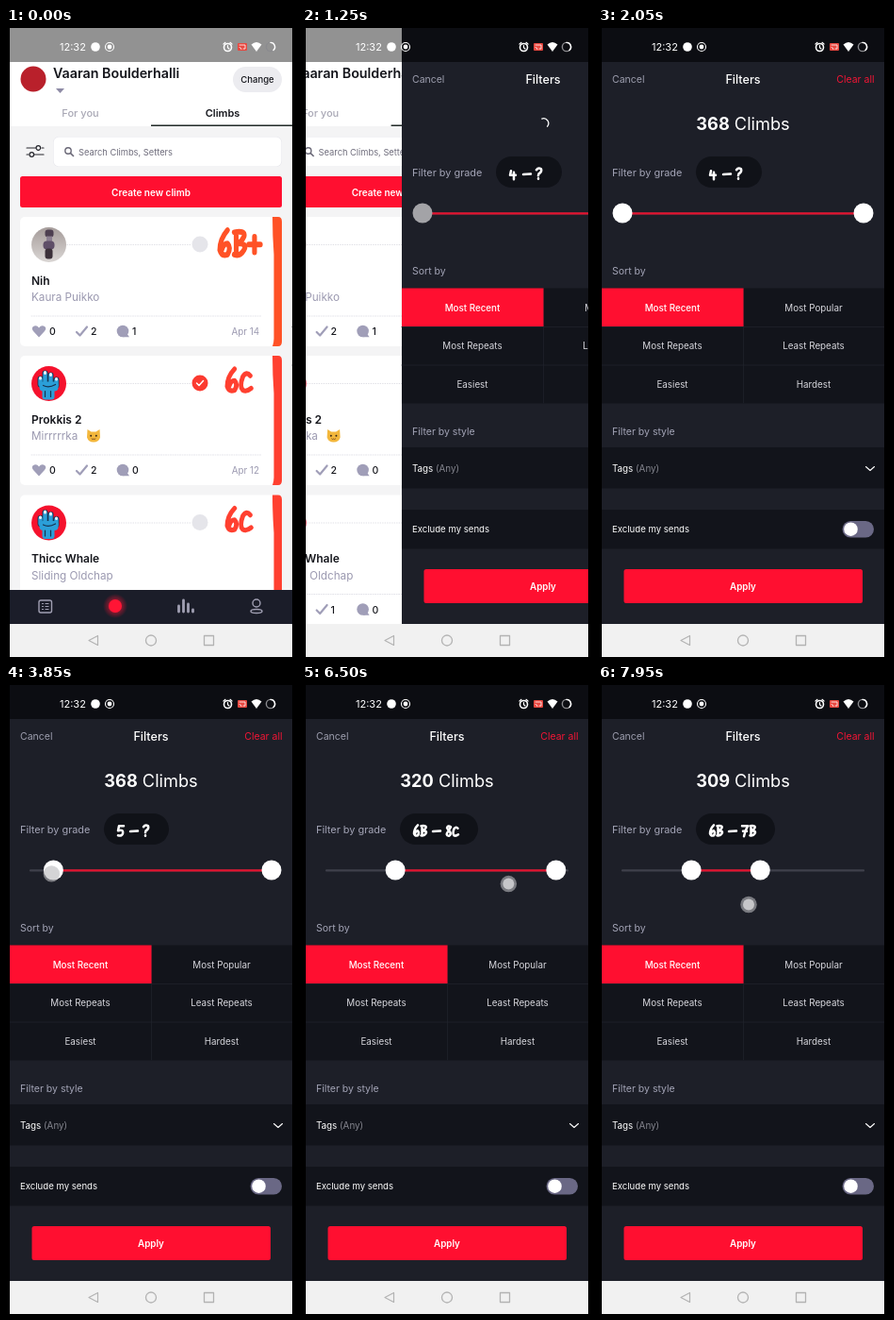
Write an HTML page that moves like this. It is 308x666 px and loops after 8000 ms.

```html
<!DOCTYPE html>
<html lang="en">
<head>
<meta charset="utf-8">
<title>Climb filters</title>
<style>
  html, body { margin: 0; width: 100%; height: 100%; overflow: hidden; background: #000; }
  svg { display: block; width: 100vw; height: 100vh; font-family: Inter, Roboto, sans-serif; }
  .line { fill: none; stroke-linecap: round; stroke-linejoin: round; }
</style>
</head>
<body>
<svg id="stage" viewBox="0 0 308 666"></svg>
<script>
const LOOP = 8000, RED = '#ff0f30', GREY = '#9b99b0', DARK = '#15161c';
const GRADES = ['4', '4+', '5', '5+', '6A', '6A+', '6B', '6B+', '6c', '6c+', '7A', '7A+',
  '7B', '7B+', '7c', '7c+', '8A', '8A+', '8B', '8B+', '8c', '?'];

// Brush lettering: advance width and stroke path on a 12-unit cap height
const GLYPHS = {
  4: [9, 'M2 3L1 7.5H7M5 4.5V12'],
  5: [8, 'M7 1H2L1 6Q7 4 6 9 5 12 1 11'],
  6: [7.5, 'M5 0Q1 4 1 9 2 12 5 11 7 8 5 6 3 6 2 9'],
  7: [8.5, 'M1 1H7Q4 6 3 12M2 6.5H6'],
  8: [7.5, 'M6 2Q3 0 2 3 3 5 5 7 7 10 4 11.5 0 11 3 7L6 2'],
  A: [8, 'M1 12L4 0 7 12M1.5 8H6'],
  B: [7.5, 'M2 1V11M1 1Q7 0 6 3 5 5 3 6 8 6 6 9 4 12 1 11'],
  c: [7.5, 'M6 3.5Q4 1 2 4 0 9 2 11 4 12 6.5 10'],
  '+': [8, 'M1 6.5H7M4 3V10'],
  '-': [19, 'M6 6.8L14 6.2'],
  '?': [8, 'M1 2Q3 -1 6 1 7 4 3.5 6L3 8M3 11V11.5']
};

const text = (x, y, size, str, fill, weight = 400, anchor = 'start') =>
  `<text x="${x}" y="${y}" font-size="${size}" fill="${fill}" font-weight="${weight}" text-anchor="${anchor}">${str}</text>`;
const rect = (x, y, w, h, fill, r = 0) =>
  `<rect x="${x}" y="${y}" width="${w}" height="${h}" rx="${r}" fill="${fill}"/>`;
const circle = (x, y, r, fill, extra = '') =>
  `<circle cx="${x}" cy="${y}" r="${r}" fill="${fill}" ${extra}/>`;
const line = (d, stroke, w = 1, extra = '') =>
  `<path class="line" d="${d}" stroke="${stroke}" stroke-width="${w}" ${extra}/>`;
const at = (x, y, body) => `<g transform="translate(${x} ${y})">${body}</g>`;

const brushWidth = str => [...str].reduce((sum, c) => sum + GLYPHS[c][0], 0);
function brush(str, color, weight) {
  let x = 0;
  return [...str].map(c => {
    const part = at(x, 0, line(GLYPHS[c][1], color, weight));
    x += GLYPHS[c][0];
    return part;
  }).join('');
}

const bottle = circle(0, 0, 18.5, 'url(#photo)') +
  rect(-4, -16, 9, 8, '#4d3f50', 3) + rect(-2.5, -9, 6, 6, '#8b7f90') +
  rect(-6, -4, 12, 9, '#5f4f68', 4) + rect(-4, 4, 8, 11, '#3b3039', 3);
const glove = circle(0, 0, 18.5, '#f5122d') +
  line('M-9 -5V1M-4 -11V0M2 -9V0M8 -4V2', '#16324e', 6) +
  line('M-9 -5V1M-4 -11V0M2 -9V0M8 -4V2', '#2b9fd8', 4.4) +
  line('M-9 -6V-5.5M-4 -12V-11M2 -10V-9M8 -5V-4.5', '#e8f2f8', 3) +
  rect(-10, -2, 20, 10, '#2b9fd8', 4) + rect(-7, 4, 13, 13, '#2b9fd8', 3) +
  line('M-6 2Q0 5 7 1M-4 8V14M2 8V14', '#16324e', 1.2);
const cat = at(93, 85, '<path d="M-6.5 -7L-2.5 -4.5H2.5L6.5 -7 7 1.5Q5.5 6.5 0 6.5T-7 1.5Z" fill="#f3b73c"/>' +
  circle(-2.8, -.3, 1, '#3a2a1a') + circle(2.8, -.3, 1, '#3a2a1a') + line('M-2 3Q-1 4.2 0 3 1 4.2 2 3', '#7a4a20', .9));

function card(y, { name, setter, avatar, grade, gx, gy, sx, sy, color, sent, stats, date, pet = '' }) {
  const status = sent
    ? circle(206, 29, 8.5, '#fb3a30') + line('M202.5 29L205 31.5 209.5 26.5', '#fff', 1.5)
    : circle(206, 29, 8.5, '#e5e5ea');
  return at(0, y,
    rect(15, 0, 278, 137, '#fff', 5) +
    `<path d="M283 0H289Q293 0 293 5V132Q293 137 289 137H283Q284.5 133 284.5 129V40Q283 20 283 0Z" fill="${color}"/>` +
    line('M65 29.5H197', '#dedee4', 1, 'stroke-dasharray=".5 2"') +
    at(45.5, 29.5, avatar) + status +
    `<g transform="translate(${gx} ${gy}) scale(${sx} ${sy})">${brush(grade, color, 2.5)}</g>` +
    text(27, 71.5, 12, name, DARK, 600) + text(27, 89, 11.7, setter, GREY) + pet +
    line('M27 105H271', '#e4e4ea', 1, 'stroke-dasharray="1 1.5"') +
    '<path d="M35 127.5L29 121Q26 117 30 115.5 33 114.5 35 117.5 37 114.5 40 115.5 44 117 41 121Z" fill="#a09eb8"/>' +
    line('M75 122L78.5 125.5 86 116.5', '#a09eb8', 2.2) +
    circle(124, 121, 6.3, '#a09eb8') + '<path d="M128 123L131 127.3H124Z" fill="#a09eb8"/>' +
    stats.map((n, i) => text([46, 90, 134][i], 125, 10.5, n, DARK, 500)).join('') +
    text(269, 125, 9.8, date, GREY, 400, 'end'));
}

const hard = { avatar: glove, grade: '6c', gx: 233, gy: 14, sx: 1.95, sy: 2.05, color: '#ff4030' };
const listScreen =
  rect(4, 0, 300, 36, '#929292') + rect(4, 36, 300, 68, '#fff') + rect(4, 104, 300, 527, '#f4f4f5') +
  circle(29, 54, 13.5, '#b9202b') +
  text(50, 53, 14.3, 'Vaaran Boulderhalli', DARK, 600) +
  '<path d="M53 64H62L57.5 69Z" fill="#8d8aa5"/>' +
  rect(241, 41, 52, 27, '#ececf0', 13.5) + text(267, 58, 9.5, 'Change', DARK, 500, 'middle') +
  text(79, 94, 11, 'For you', '#a9a8b5', 500, 'middle') +
  text(230, 94, 11, 'Climbs', DARK, 600, 'middle') + rect(154, 102.5, 150, 1.5, '#222b28') +
  `<g id="filterIcon">${line('M22 127H32M38 127H40M22 134H24M30 134H40', '#24252c', 1.2)}
    ${line('M32 127a2.3 2.3 0 1 0 4.6 0a2.3 2.3 0 1 0 -4.6 0M25 134a2.3 2.3 0 1 0 4.6 0a2.3 2.3 0 1 0 -4.6 0', '#24252c', 1.2)}</g>` +
  rect(50, 115, 243, 32, '#e8e8ed', 6) + rect(50.6, 115.6, 241.8, 30.8, '#fff', 5.5) +
  circle(66, 130, 3.2, 'none', 'stroke="#6b6978" stroke-width="1.4"') + line('M68.6 132.6L71.5 135.5', '#6b6978', 1.6) +
  text(77, 134.5, 9.3, 'Search Climbs, Setters', '#6f6d7c') +
  rect(15, 157, 278, 33, RED, 2.5) + text(154, 177.5, 10, 'Create new climb', '#fff', 600, 'middle') +
  card(200, { name: 'Nih', setter: 'Kaura Puikko', avatar: bottle, grade: '6B+', gx: 225, gy: 14,
    sx: 2.05, sy: 2.35, color: '#ff5226', stats: [0, 2, 1], date: 'Apr 14' }) +
  card(347, { ...hard, name: 'Prokkis 2', setter: 'Mirrrrrka', sent: true, pet: cat, stats: [0, 2, 0], date: 'Apr 12' }) +
  card(494.5, { ...hard, name: 'Thicc Whale', setter: 'Sliding Oldchap', stats: [0, 1, 0], date: 'Apr 12' });

const tabBar = rect(4, 595, 300, 36, '#1b1d29') +
  '<rect x="35" y="606" width="13.5" height="13" rx="2" fill="none" stroke="#a09fb2" stroke-width="1.4"/>' +
  line('M38.5 609.5H39.5M42 609.5H45M38.5 612.5H39.5M42 612.5H45M38.5 615.5H39.5M42 615.5H45', '#a09fb2', 1.2) +
  circle(116, 612, 13, 'url(#glow)') + circle(116, 612, 7, '#ff1535') +
  line('M183.5 618V612M188.5 618V606M193.5 618V610M198.5 618V616', '#a09fb2', 2.8) +
  circle(266, 609, 4, 'none', 'stroke="#a09fb2" stroke-width="1.4"') +
  '<ellipse cx="266" cy="617.5" rx="6" ry="2" fill="none" stroke="#a09fb2" stroke-width="1.4"/>';

const SORTS = ['Most Recent', 'Most Popular', 'Most Repeats', 'Least Repeats', 'Easiest', 'Hardest'];
const panelScreen =
  rect(4, 0, 300, 631, '#1d1f28') + rect(4, 0, 300, 36, '#0c0d12') +
  text(15, 57.5, 10.5, 'Cancel', '#9d9eae') + text(154, 58.5, 12.6, 'Filters', '#fff', 500, 'middle') +
  text(293.5, 57.5, 10.5, 'Clear all', '#f01535', 400, 'end') +
  '<text id="count" x="154" y="108" font-size="18.2" fill="#fff" text-anchor="middle"><tspan id="total" font-weight="700"></tspan> Climbs</text>' +
  `<g id="spinner">${line('M1.5 -5A5.2 5.2 0 0 1 1.5 5', '#fff', 1.3)}</g>` +
  text(15, 156.5, 10.9, 'Filter by grade', '#a3a4b6') +
  '<rect id="pill" x="104" y="136" height="33" rx="16.5" fill="#101218"/><g id="range" transform="translate(118 148.3)"></g>' +
  line('M26 196.4H282', '#3f404b', 2.2) +
  line('', '#e3122e', 2.2, 'id="active"') + circle(26, 196, 10.5, '#fff', 'id="low"') + circle(282, 196, 10.5, '#fff', 'id="high"') +
  text(15, 261, 10.5, 'Sort by', '#a3a4b6') +
  rect(4, 275.5, 300, 122, '#12141b') +
  line('M154.5 275.5V397M4 316.5H304M4 357H304', '#20222b', .8) + rect(4, 275.5, 150.5, 40.5, RED) +
  SORTS.map((s, i) => text(i % 2 ? 229 : 79, 299.5 + 40.7 * (i >> 1), 9.8, s, i ? '#d6d6dc' : '#fff', i ? 400 : 500, 'middle')).join('') +
  text(15, 430.5, 10.5, 'Filter by style', '#a3a4b6') +
  rect(4, 444, 300, 43.5, '#12141b') +
  text(15, 470, 9.8, 'Tags <tspan fill="#85868f">(Any)</tspan>', '#fff') + line('M284.5 464.5L289 468.5 293.5 464.5', '#fff', 1.1) +
  rect(4, 510, 300, 41.5, '#12141b') + text(15, 534, 9.6, 'Exclude my sends', '#fff') +
  rect(259.5, 522, 33.5, 17.5, '#6a6885', 8.75) + circle(268.5, 530.7, 7.3, '#fff') +
  rect(27.5, 573, 253.5, 36, RED, 2.5) + text(154, 594.5, 9.8, 'Apply', '#fff', 600, 'middle');

const statusIcons = text(57, 24, 11, '12:32', '#fff') + circle(95, 20, 4.8, '#fff') +
  circle(110, 20, 4.5, 'none', 'stroke="#fff" stroke-width="1.1"') + circle(110, 20, 2.4, '#fff') +
  circle(235.5, 20.5, 4, 'none', 'stroke="#fff" stroke-width="1.6"') + line('M235.5 18.5V20.7L237 22M231 17L233 15.3M240 17L238 15.3', '#fff', 1.2) +
  rect(246, 16, 10, 8, '#e8473f', 1) + line('M248 18H254V22H252M248 20.5Q250 20.5 250 22.5', '#fff', .8) +
  '<path d="M260.5 17.5Q266 12.5 271.5 17.5L266 25Z" fill="#fff"/>' +
  circle(281, 20, 4.6, 'none', 'stroke="#8b8b8f" stroke-width="1.4"') + line('M281 15.4A4.6 4.6 0 0 1 284 23.5', '#fff', 1.4);
const systemBar = rect(4, 631, 300, 35, '#f1f1f1') +
  line('M97.5 643.5V653.5L88 648.5Z', '#b3b3b3', 1.2) + circle(154, 648.5, 5.5, 'none', 'stroke="#b3b3b3" stroke-width="1.3"') +
  line('M210.5 643.5H220.5V653.5H210.5Z', '#b3b3b3', 1.3);

document.getElementById('stage').innerHTML = `
  <defs>
    <clipPath id="screen"><rect x="4" width="300" height="666"/></clipPath>
    <linearGradient id="photo" x2="0" y2="1"><stop stop-color="#a59c9a"/><stop offset="1" stop-color="#dad6d4"/></linearGradient>
    <radialGradient id="glow"><stop offset=".4" stop-color="#ff1535" stop-opacity=".55"/><stop offset="1" stop-color="#ff1535" stop-opacity="0"/></radialGradient>
  </defs>
  <rect width="308" height="666"/>
  <g clip-path="url(#screen)">
    <g id="list">${listScreen}</g><g id="tabs">${tabBar}</g><g id="panel">${panelScreen}</g>
    ${statusIcons}${systemBar}
    <g id="finger">${circle(0, 0, 8.7, '#b9b9bd', 'opacity=".6"')}${circle(0, 0, 6, '#d3d3d6', 'opacity=".85"')}</g>
  </g>`;

const el = Object.fromEntries([...document.querySelectorAll('[id]')].map(e => [e.id, e]));
const set = (e, attrs) => Object.entries(attrs).forEach(([k, v]) => e.setAttribute(k, v));

// Linear interpolation through [time, value] pairs
function track(t, keys) {
  const i = keys.findIndex(k => k[0] > t);
  if (i < 0) return keys[keys.length - 1][1];
  if (!i) return keys[0][1];
  const [t0, a] = keys[i - 1], [t1, b] = keys[i];
  return a + (b - a) * (t - t0) / (t1 - t0);
}
const passed = (t, times) => times.filter(s => t >= s).length;

const LOW_STEPS = [3740, 3840, 3930, 4020, 4130, 4260];
const HIGH_STEPS = [6430, 6560, 6640, 6720, 6820, 6920, 7080, 7250, 7870];
const DIM = [[1850, 0], [2030, 1], [4430, 1], [4650, .3], [4870, .3], [5080, 1], [7350, 1], [7500, .3], [7560, .3], [7760, 1]];
// Each touch: horizontal and vertical tracks, visible between the first and last time
const TOUCHES = [
  { x: [[900, 31], [1050, 31]], y: [[900, 131], [1050, 131]] },
  { x: [[3600, 26], [3720, 32], [4250, 98], [4400, 100]], y: [[3600, 198], [4400, 204]] },
  { x: [[6150, 284], [6280, 268], [6500, 219.5], [6700, 187], [6950, 164], [7900, 160], [8000, 160]],
    y: [[6150, 198], [6500, 210.5], [6950, 224], [7900, 232.5], [8000, 232.5]] }
];

function draw(t) {
  const s = 17 * Math.max(0, t - 1118) / 1000;
  const away = (1 + s) * Math.exp(-s);
  const loaded = t >= 1850;
  set(el.panel, { transform: `translate(${300 * away} 0)` });
  set(el.list, { transform: `translate(${-90 * (1 - away)} 0)` });
  set(el.tabs, { visibility: t < 1118 ? 'visible' : 'hidden' });
  set(el.filterIcon, { opacity: track(t, [[930, 1], [1060, .3]]) });

  set(el.spinner, { visibility: loaded ? 'hidden' : 'visible', transform: `translate(154.5 101) rotate(${(t - 1350) * .36})` });
  set(el.count, { opacity: track(t, DIM) });
  el.total.textContent = t < 4860 ? 368 : t < 7530 ? 320 : 309;

  const low = passed(t, LOW_STEPS), high = 21 - passed(t, HIGH_STEPS);
  const lowX = 26 + low * 256 / 21, highX = 26 + high * 256 / 21;
  const knob = loaded ? '#fff' : '#a3a3a7';
  set(el.low, { cx: lowX, fill: knob });
  set(el.high, { cx: highX, fill: knob });
  set(el.active, { d: `M${lowX} 196.4H${highX}` });
  const range = `${GRADES[low]}-${GRADES[high]}`;
  set(el.pill, { width: 34 + brushWidth(range) });
  if (el.range.dataset.value !== range) {
    el.range.dataset.value = range;
    el.range.innerHTML = brush(range, '#fff', 2.5);
  }

  const touch = TOUCHES.find(({ x }) => t >= x[0][0] && t < x[x.length - 1][0]);
  set(el.finger, { visibility: touch ? 'visible' : 'hidden' });
  if (touch) set(el.finger, { transform: `translate(${track(t, touch.x)} ${track(t, touch.y)})` });
}

const start = performance.now();
function tick() {
  draw((performance.now() - start) % LOOP);
  requestAnimationFrame(tick);
}
tick();
</script>
</body>
</html>
```
